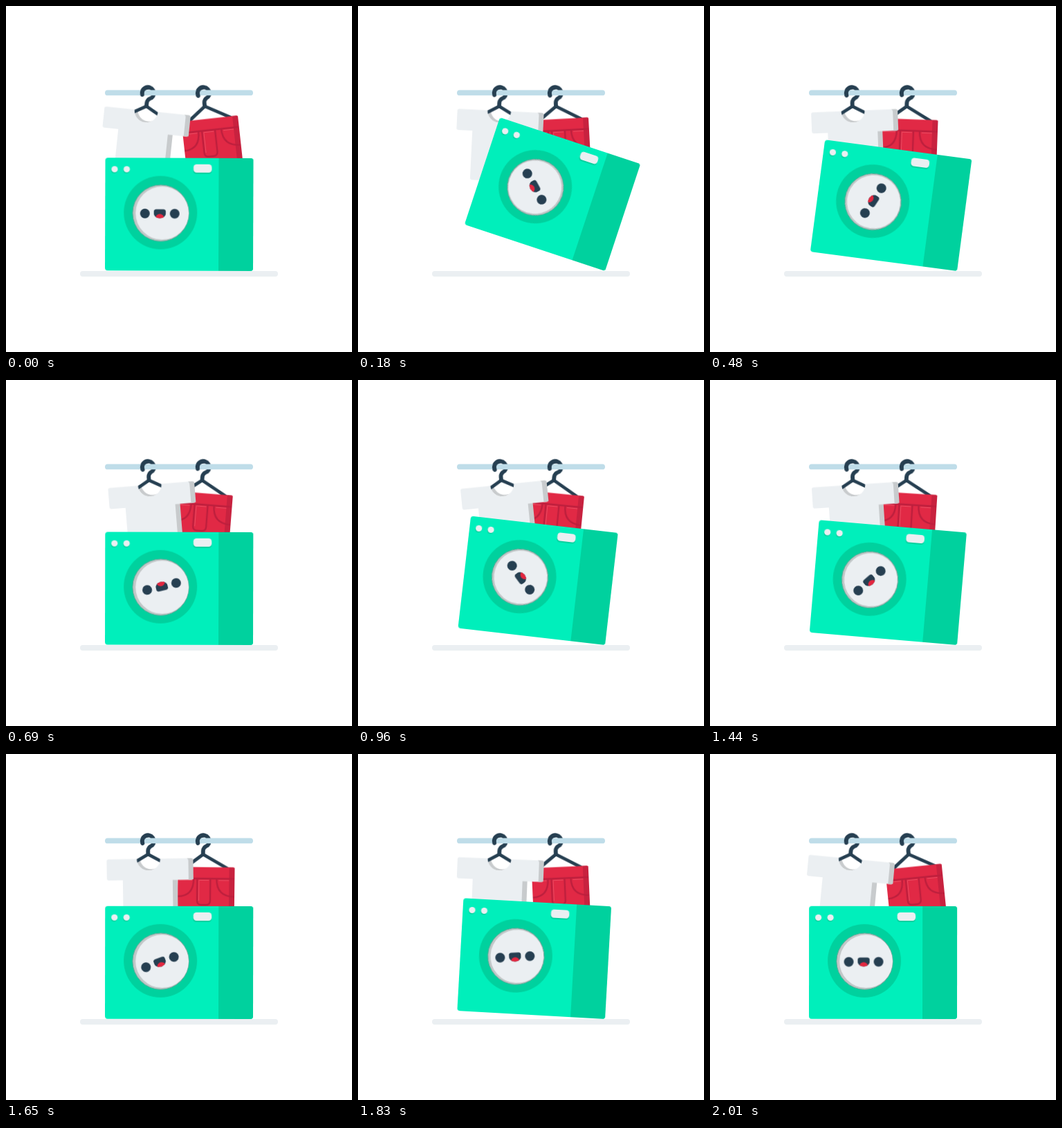
Animation, 500 px wide and 500 px high, one loop 2040 ms. Source, as an HTML page:

```html
<!DOCTYPE html>
<html lang="en">
<head>
<meta charset="utf-8">
<title>Washing machine</title>
<style>
  @property --tilt { syntax: "<number>"; inherits: true; initial-value: 0; }

  html, body { margin: 0; width: 100%; height: 100%; overflow: hidden; background: #fff; }
  svg { display: block; width: 100%; height: 100%; }

  :root {
    --loop: 2040ms;
    --ink: #263f51;
    --pale: #ebeff2;
    --grey: #c8cbcd;
    --green: #00efbb;
    --shade: #00d19e;
    --wine: #bd1f3d;
  }

  .ink { fill: none; stroke: var(--ink); stroke-width: 5.8; }
  .arms { stroke-width: 4.8; }
  .tip { stroke-linecap: round; }
  .pale { fill: var(--pale); }
  .grey { fill: var(--grey); }
  .green { fill: var(--green); }
  .shade { fill: var(--shade); }
  .seam { fill: none; stroke: var(--wine); stroke-width: 2.4; }

  .swing { animation: swing calc(var(--loop) / 2) cubic-bezier(.39, .575, .565, 1) infinite alternate; }
  .left { --from: 6deg; --to: -5.8deg; }
  .right { --from: -6.3deg; --to: 5.7deg; }
  @keyframes swing {
    from { transform: rotate(var(--from)); }
    to { transform: rotate(var(--to)); }
  }

  /* Each hop slows down on the way up and speeds up on the way down. */
  .washer { transform: rotate(calc(var(--tilt) * 1deg)); animation: bounce var(--loop) infinite; }
  @keyframes bounce {
    0%, 35.8%, 60.5%, 83% { --tilt: 0; animation-timing-function: cubic-bezier(.333, 1.05, .667, 1); }
    16.67%, 47.35%, 71%, 90.9% { animation-timing-function: cubic-bezier(.333, 0, .667, .115); }
    16.67% { --tilt: 20; }
    47.35% { --tilt: 6.6; }
    71%    { --tilt: 4.9; }
    90.9%  { --tilt: 3.2; }
    100%   { --tilt: 0; }
  }

  .plate { transform: translateX(calc(2px - var(--tilt) * .15px)); }
  .face { animation: spin var(--loop) cubic-bezier(.333, .44, .667, 1) infinite; }
  @keyframes spin { to { transform: rotate(360deg); } }
</style>
</head>
<body>
<svg viewBox="0 0 500 500">
  <defs>
    <path id="hook" class="ink" d="M-7.7 3.9A8.5 8.5 0 1 1 6.3 7Q0 10 0 15V21"/>
    <path id="tip" class="ink tip" d="M-7.7 3.9A8.500 8.500 0 0 1 .3 -7.5"/>
    <clipPath id="box"><rect x="-214" y="-163" width="214" height="163" rx="4"/></clipPath>
    <clipPath id="mouth"><path d="M-9 -1Q-9 -5.500 -5 -5.500H5Q9 -5.500 9 -1C9 4 5 7.500 0 7.500S-9 4 -9 -1Z"/></clipPath>
  </defs>

  <rect class="pale" x="107" y="383" width="286" height="8" rx="4"/>

  <!-- shorts -->
  <g transform="translate(285 125)"><g class="swing right">
    <use href="#hook"/>
    <path class="ink arms" d="M-29 42L0 20L38 41.5"/>
    <path fill="#e12945" d="M-34 38.5H44Q46 38.5 46 40.5V102H-36V40.5Q-36 38.5 -34 38.5Z"/>
    <path fill="#c8223f" d="M38 38.5H44Q46 38.5 46 40.5V102H38Z"/>
    <path class="seam" d="M-36 55H46M-13 55Q-13 81 -36 81M20 55Q20 81 46 81M-8 55V87Q-8 93 -2 93H5Q11 93 11 87V55"/>
    <path fill="none" stroke="#eb4b61" d="M-34 57.5H-15M-5.5 57.5V87M-5.5 57.5H9M23 57.5H38"/>
  </g></g>

  <!-- shirt -->
  <g transform="translate(205 125)"><g class="swing left">
    <path class="grey" d="M-16.5 26.5A17 17 0 0 0 17.5 26.5Z"/>
    <circle cx="4.5" cy="25" r="16.5" fill="#fff"/>
    <use href="#hook"/>
    <path class="ink arms" d="M-19 31L0 20L20 31"/>
    <path class="pale" d="M-58 26.5H-16.5A17 17 0 0 0 17.5 26.5H62Q65 26.5 65 29.5V55Q65 57.5 62 57.5H42V125Q42 128 39 128H-34Q-37 128 -37 125V57H-57Q-60 57 -60 54V29Q-60 26.5 -58 26.5Z"/>
    <path class="grey" d="M56 26.5H62Q65 26.5 65 29.5V55Q65 57.5 62 57.5H58V30Q58 27 56 26.5ZM35 57.5H42V125Q42 128 39 128H35Z"/>
  </g></g>

  <!-- rail -->
  <rect x="143" y="121.5" width="214" height="7.8" rx="3.9" fill="#bfdde9"/>
  <g transform="translate(285 125)"><use class="swing right" href="#tip"/></g>
  <g transform="translate(205 125)"><use class="swing left" href="#tip"/></g>

  <!-- washer, hinged on its lower right corner -->
  <g transform="translate(357 383)"><g class="washer">
    <g clip-path="url(#box)">
      <path class="green" d="M-214 -163H0V0H-214Z"/>
      <path class="shade" d="M-50 -163H0V0H-50Z"/>
    </g>
    <g class="shade">
      <circle cx="-201" cy="-145" r="4.6"/>
      <circle cx="-183.5" cy="-145" r="4.6"/>
      <rect x="-87" y="-152.5" width="27" height="12.5" rx="4.5"/>
      <circle cx="-134" cy="-84" r="53"/>
    </g>
    <g class="pale">
      <circle cx="-200.5" cy="-146.5" r="4.6"/>
      <circle cx="-183" cy="-146.5" r="4.6"/>
      <rect x="-86.5" y="-154" width="26.5" height="12" rx="4.5"/>
    </g>
    <g transform="translate(-133.5 -83.3)">
      <circle r="40.7" fill="#c2c7c8" stroke="#62a897"/>
      <circle class="plate pale" r="38.4"/>
      <g class="face" fill="#263f51">
        <circle cx="-23" cy=".7" r="7"/>
        <circle cx="20" cy=".7" r="7"/>
        <g transform="translate(-1.5 0)" clip-path="url(#mouth)">
          <path d="M-9 -6H9V8H-9Z"/>
          <circle cy="7.5" r="6.2" fill="#e3263f"/>
        </g>
      </g>
    </g>
  </g></g>
</svg>
</body>
</html>
```
